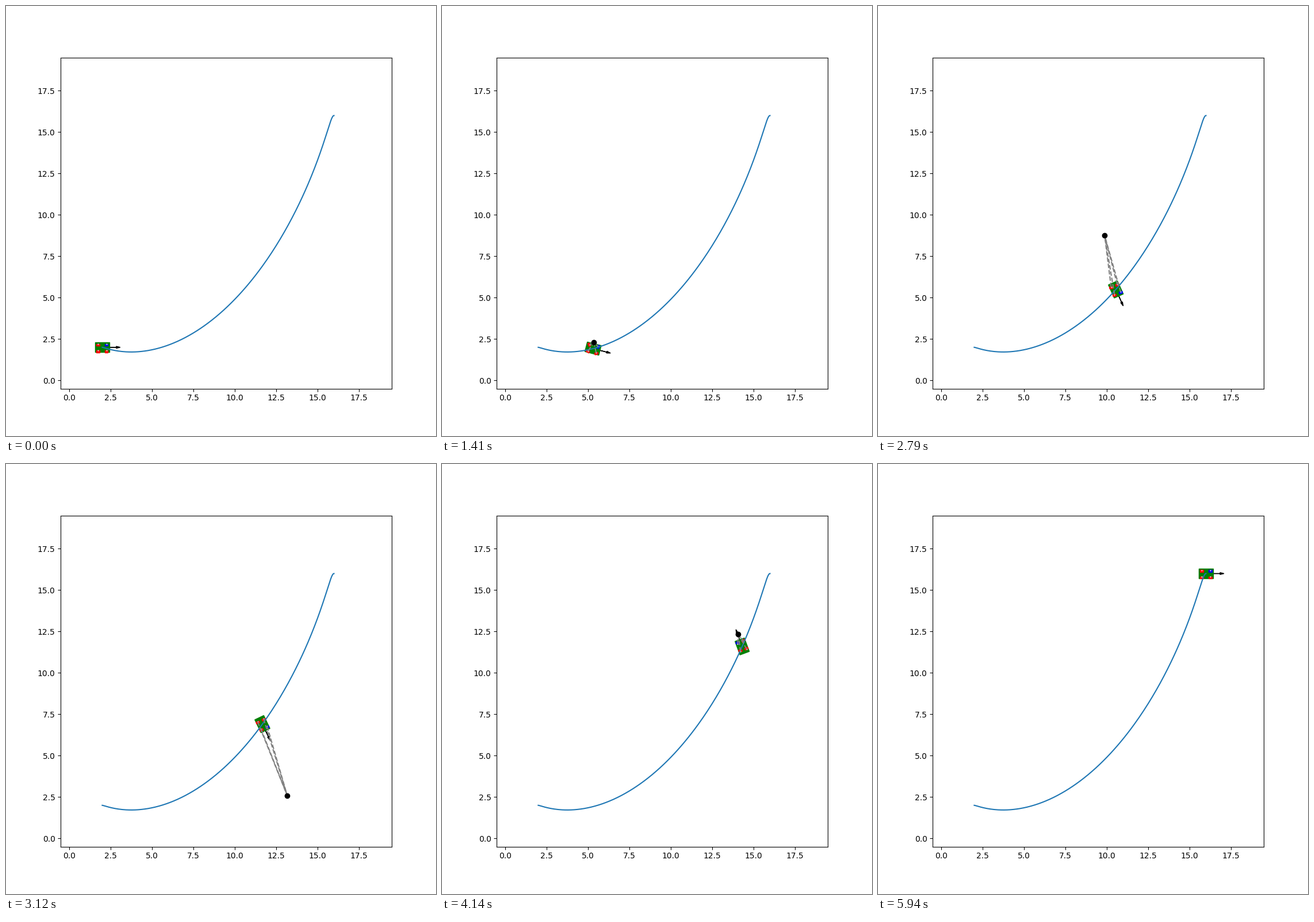
Write a matplotlib script that moves like this. It is 748 by 748 pixels and loops after 5970 ms.

```python
import math

import numpy as np
import matplotlib.pyplot as plt
from matplotlib.animation import FuncAnimation
from matplotlib.patches import FancyArrow, Polygon

STEPS = 199
PATH_X = [2, 2.42, 9.77, 15.22, 15.55, 16]
PATH_Y = [2, 2, -1.84, 11.03, 16, 16]
VEL_X = [2.1, 40.5, -27.6, 11.9, 2.1]
VEL_Y = [0, -18.6, 42.6, 34, 0]
SPIN = 184

BODY = 0.87, 0.6
WHEEL = 0.2, 0.12
WHEEL_DROP = 0.045
MOUNTS = [(0.25, 0.2), (0.25, -0.2), (-0.25, 0.2), (-0.25, -0.2)]


def bernstein(ctrl, u):
    n = len(ctrl) - 1
    return sum(c * math.comb(n, k) * u**k * (1 - u)**(n - k)
               for k, c in enumerate(ctrl))


def turn(pts, angle):
    c, s = math.cos(angle), math.sin(angle)
    return np.asarray(pts) @ np.array([[c, s], [-s, c]])


def box(size, drop=0):
    w, h = size[0] / 2, size[1] / 2
    return np.array([(-w, -h), (w, -h), (w, h), (-w, h)]) - (0, drop)


fig, ax = plt.subplots(figsize=(7.48, 7.48), dpi=100)
ax.set_aspect("equal")
ax.set_xlim(-0.5, 19.5)
ax.set_ylim(-0.5, 19.5)
ticks = np.arange(0, 18, 2.5)
ax.set_xticks(ticks)
ax.set_yticks(ticks)

grid = np.linspace(0, 1, STEPS)
ax.plot(bernstein(PATH_X, grid), bernstein(PATH_Y, grid), color="C0", lw=1.5)

body = ax.add_patch(Polygon(box(BODY), color="g", zorder=1.2))
wheels = [ax.add_patch(Polygon(box(WHEEL), color="b" if i == 0 else "r",
                               zorder=1.3)) for i in range(4)]
hubs, = ax.plot([], [], "o", color="lightgray", ms=1.7, mew=0, zorder=1.4)
spokes = [ax.plot([], [], "--", color="gray", lw=1.5, zorder=2.1)[0]
          for _ in MOUNTS]
center, = ax.plot([], [], "ko", zorder=2.2)
arrow = ax.add_patch(FancyArrow(0, 0, 1, 0, color="k"))


def draw(i):
    global arrow
    u = i / (STEPS - 1)
    pos = np.array([bernstein(PATH_X, u), bernstein(PATH_Y, u)])
    heading = SPIN * (u * (1 - u))**2
    omega = 2 * SPIN * u * (1 - u) * (1 - 2 * u)
    vx, vy = bernstein(VEL_X, u), bernstein(VEL_Y, u)

    arrow.remove()
    arrow = ax.add_patch(FancyArrow(
        *pos, 0.85 * math.cos(heading), 0.85 * math.sin(heading),
        width=0.01, head_width=0.12, head_length=0.24, color="k", zorder=1.1))

    body.set_xy(pos + turn(box(BODY), heading))
    mounts = pos + turn(MOUNTS, heading)
    hubs.set_data(mounts[:, 0], mounts[:, 1])
    for wheel, (mx, my), at in zip(wheels, MOUNTS, mounts):
        steer = math.atan2(vy + omega * mx, vx - omega * my)
        wheel.set_xy(at + turn(box(WHEEL, WHEEL_DROP), heading + steer))

    # The turning center exists only while the robot rotates.
    turning = abs(omega) > 1e-6
    for art in (center, *spokes):
        art.set_visible(turning)
    if turning:
        icr = pos + turn((-vy / omega, vx / omega), heading)
        center.set_data([icr[0]], [icr[1]])
        for line, at in zip(spokes, mounts):
            line.set_data([at[0], icr[0]], [at[1], icr[1]])
    return [body, arrow, hubs, center, *wheels, *spokes]


anim = FuncAnimation(fig, draw, frames=STEPS, interval=30,
                     init_func=lambda: draw(0), repeat=True, repeat_delay=0)
plt.show()
```
